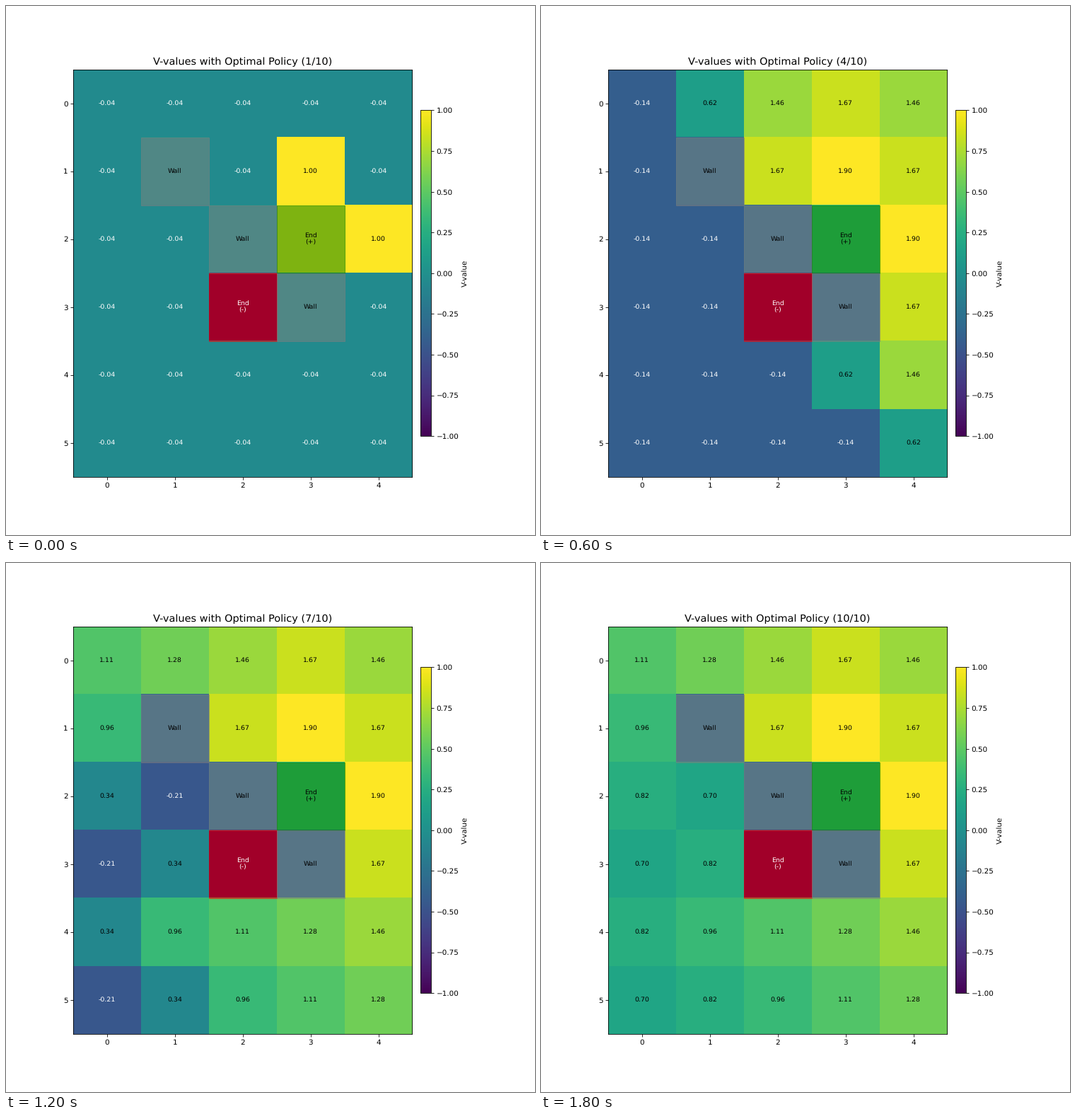
A matplotlib script that plays this animation: 748 px wide and 748 px high, repeating every 2000 ms.

```python
import numpy as np
import matplotlib.pyplot as plt
from matplotlib.animation import FuncAnimation
from matplotlib.cm import ScalarMappable
from matplotlib.colors import Normalize

SIZE, DPI = 748, 74.8
ROWS, COLS, STEPS = 6, 5, 10
GAMMA, STEP_REWARD = 0.9, -0.04
WALLS = {(1, 1), (2, 2), (3, 3)}
ENDS = {(2, 3): 1.0, (3, 2): -1.0}
MOVES = [(-1, 0), (1, 0), (0, -1), (0, 1)]
CELLS = [(r, c) for r in range(ROWS) for c in range(COLS)]


def move(cell, step):
    """Neighbouring cell, or the same cell when the way is blocked."""
    r, c = cell[0] + step[0], cell[1] + step[1]
    blocked = not (0 <= r < ROWS and 0 <= c < COLS) or (r, c) in WALLS
    return cell if blocked else (r, c)


def sweep(values):
    """One synchronous pass of value iteration."""
    new = np.zeros_like(values)
    for cell in CELLS:
        if cell in ENDS:
            new[cell] = ENDS[cell]
        elif cell not in WALLS:
            targets = [move(cell, step) for step in MOVES]
            new[cell] = max(ENDS.get(t, STEP_REWARD) + GAMMA * values[t]
                            for t in targets)
    return new


history = [sweep(np.zeros((ROWS, COLS)))]
while len(history) < STEPS:
    history.append(sweep(history[-1]))

# Unhinted glyphs keep their true proportions at this small size.
plt.rcParams["text.hinting"] = "none"
fig = plt.figure(figsize=(SIZE / DPI, SIZE / DPI), dpi=DPI)


def add_axes(left, bottom, width, height):
    """Axes placed in pixels from the lower left corner."""
    return fig.add_axes([v / SIZE for v in (left, bottom, width, height)])


ax = add_axes(94.95, 82.3, 479.53, 576.1)
image = ax.imshow(history[0], cmap="viridis", interpolation="nearest",
                  aspect="auto")
ax.set_xticks(range(COLS))
ax.set_yticks(range(ROWS))
title = ax.set_title("", fontsize=14)

bar_ax = add_axes(586.3, 139.9, 15.1, 460.7)
scale = ScalarMappable(Normalize(-1, 1), "viridis")
fig.colorbar(scale, cax=bar_ax, label="V-value",
             ticks=np.linspace(-1, 1, 9))


def add_label(cell, text="", color="black"):
    return ax.text(cell[1], cell[0], text, color=color, fontsize=9,
                   ha="center", va="center")


def add_block(cell, text, fill, color="black"):
    ax.add_patch(plt.Rectangle((cell[1] - 0.5, cell[0] - 0.5), 1, 1,
                               color=fill, alpha=0.5))
    add_label(cell, text, color)


labels = {}
for cell in CELLS:
    if cell in WALLS:
        add_block(cell, "Wall", "gray")
    elif cell in ENDS:
        if ENDS[cell] > 0:
            add_block(cell, "End\n(+)", "green")
        else:
            add_block(cell, "End\n(-)", "red", "white")
    else:
        labels[cell] = add_label(cell)


def update(i):
    values = history[i]
    image.set_data(values)
    image.set_clim(values.min(), values.max())
    title.set_text(f"V-values with Optimal Policy ({i + 1}/{STEPS})")
    for cell, label in labels.items():
        label.set_text(f"{values[cell]:.2f}")
        label.set_color("white" if values[cell] < 0 else "black")
    return [image, title, *labels.values()]


anim = FuncAnimation(fig, update, frames=STEPS, interval=200,
                     repeat=True, repeat_delay=0, blit=False)
plt.show()
```
